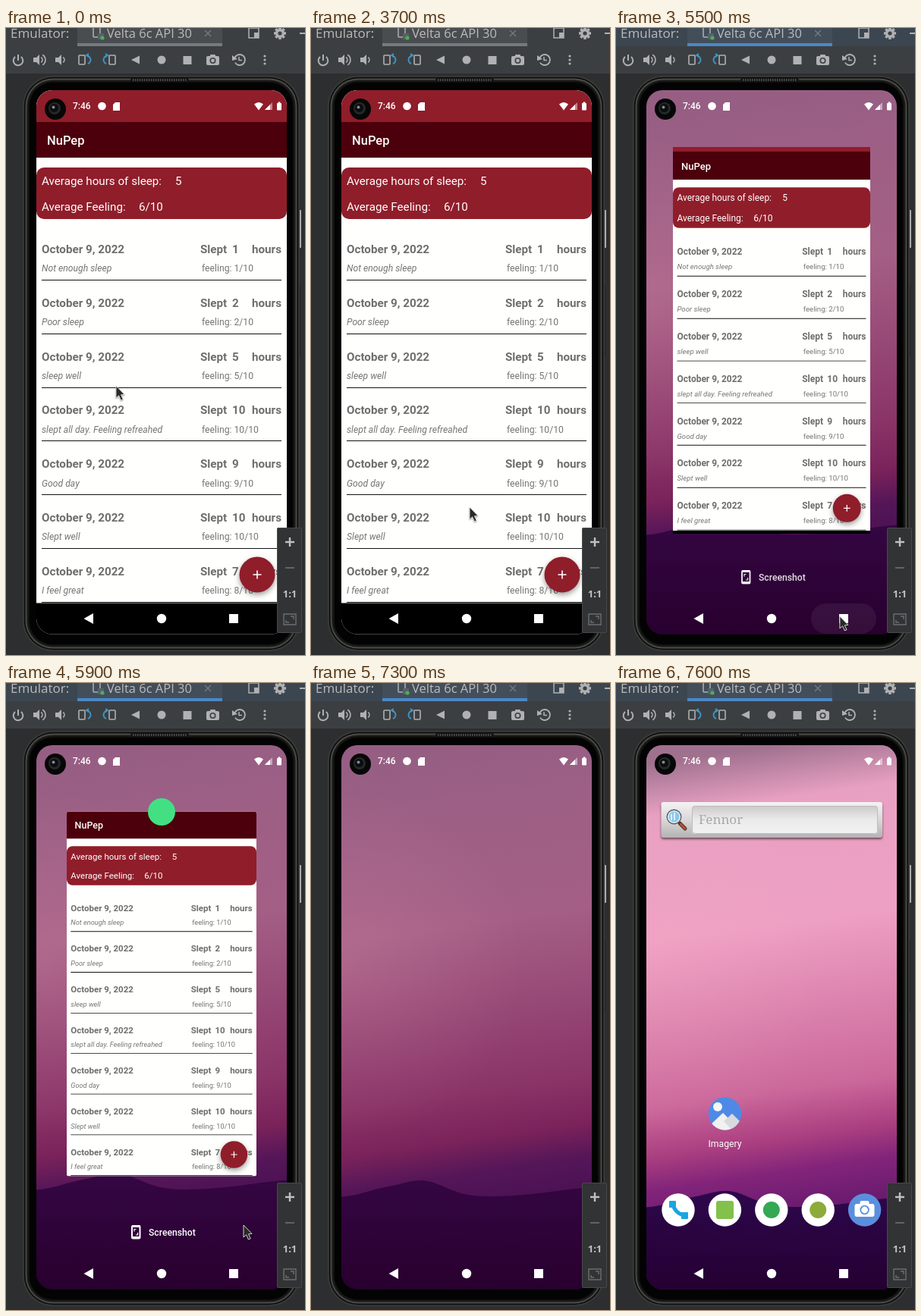
Write an HTML page with a canvas that moves like this. It is 394x827 px and loops after 8000 ms.

```html
<!DOCTYPE html>
<html lang="en">
<head>
<meta charset="utf-8">
<title>Sleep log on an emulator</title>
<style>
html, body { margin: 0; width: 100%; height: 100%; overflow: hidden; background: #2c2e30; }
canvas { display: block; width: 394px; height: 827px; }
</style>
</head>
<body>
<canvas id="stage"></canvas>
<script>
const W = 394, H = 827, LOOP = 8000, STEP = 100, TAU = Math.PI * 2;
const RED = '#901d2a', DARK_RED = '#4c000b', ICON = '#afb1b3', BLUE = '#3d94c4';
const ROBOTO = 'Roboto, sans-serif', UI = '"Open Sans", "Noto Sans", sans-serif';
const canvas = document.getElementById('stage');
const dpr = window.devicePixelRatio || 1;
canvas.width = W * dpr;
canvas.height = H * dpr;
const c = canvas.getContext('2d');

const clamp = v => Math.max(0, Math.min(1, v));
const lerp = (a, b, u) => a + (b - a) * u;
const span = (t, a, b) => clamp((t - a) / (b - a));

function box(x, y, w, h, fill, r = 0) {
  c.beginPath();
  c.roundRect(x, y, w, h, r);
  c.fillStyle = fill;
  c.fill();
}
function frame(x, y, w, h, color, width = 1.5, r = 0) {
  c.beginPath();
  c.roundRect(x, y, w, h, r);
  c.strokeStyle = color;
  c.lineWidth = width;
  c.stroke();
}
function disc(x, y, r, fill) {
  c.beginPath();
  c.arc(x, y, r, 0, TAU);
  c.fillStyle = fill;
  c.fill();
}
function arc(x, y, r, a, b, color, width) {
  c.beginPath();
  c.arc(x, y, r, a, b);
  c.strokeStyle = color;
  c.lineWidth = width;
  c.stroke();
}
function trace(pts) {
  c.beginPath();
  for (let i = 0; i < pts.length; i += 2) c.lineTo(pts[i], pts[i + 1]);
}
function poly(fill, ...pts) {
  trace(pts);
  c.closePath();
  c.fillStyle = fill;
  c.fill();
}
function line(color, width, ...pts) {
  trace(pts);
  c.strokeStyle = color;
  c.lineWidth = width;
  c.stroke();
}
function plus(x, y, size, width, color) {
  box(x - size / 2, y - width / 2, size, width, color);
  box(x - width / 2, y - size / 2, width, size, color);
}
function text(s, x, y, font, fill, align = 'left') {
  c.font = font;
  c.fillStyle = fill;
  c.textAlign = align;
  c.fillText(s, x, y);
}
function vertical(y0, y1, ...stops) {
  const g = c.createLinearGradient(0, y0, 0, y1);
  stops.forEach((s, i) => g.addColorStop(i / (stops.length - 1), s));
  return g;
}
function shadow(color, blur, dy) {
  c.shadowColor = color;
  c.shadowBlur = blur;
  c.shadowOffsetY = dy;
}
function fade(alpha, paint) {
  if (alpha <= 0) return;
  c.save();
  c.globalAlpha = alpha;
  paint();
  c.restore();
}

// ---- Emulator window ----

function header(focused) {
  box(0, 0, W, 24, focused ? '#3c4651' : '#3c3f41');
  box(94, 0, 191, 20, focused ? '#434e5b' : '#4a4d50');
  box(94, 20, 191, 4, focused ? '#4a88c7' : '#747a80');
  text('Emulator:', 6, 13, '17px ' + UI, '#bbbbbb');
  text('Velta 6c API 30', 133, 13, '16.5px ' + UI, '#bbbbbb');
  frame(115, -4, 9, 16, ICON, 1.5, 1);
  box(121, 7, 8, 8, '#53626b');
  disc(127, 13, 2.6, '#4fae50');
  line('#777a7d', 1.2, 262, 3, 270, 11);
  line('#777a7d', 1.2, 270, 3, 262, 11);
  frame(320, 0, 13, 13, ICON);
  box(327, 6, 6, 7, ICON);
  for (let i = 0; i < 4; i++) {
    const a = i * TAU / 8, dx = Math.cos(a) * 8, dy = Math.sin(a) * 8;
    line(ICON, 3.5, 361 - dx, 7 - dy, 361 + dx, 7 + dy);
  }
  disc(361, 7, 6, ICON);
  disc(361, 7, 2.6, '#3c4044');
  box(387, 6, 7, 2, ICON);
}

function speaker(x, waves) {
  poly(ICON, x - 7, 39, x - 3, 39, x + 1, 35, x + 1, 49, x - 3, 45, x - 7, 45);
  for (let i = 0; i < waves; i++) arc(x + 1, 42, 4 + i * 4, -1, 1, ICON, 1.6);
}
function rotateIcon(x, side) {
  c.save();
  c.translate(x, 42);
  c.scale(side, 1);
  frame(-8, -6, 8, 12, ICON, 1.6, 1);
  arc(2, 0, 5.5, -1.2, 1.2, BLUE, 2);
  poly(BLUE, 0, -6, 5, -9, 5, -3);
  c.restore();
}
function toolbar() {
  box(0, 24, W, 36, '#3c3f41');
  arc(16, 43, 6.3, -0.9, Math.PI + 0.9, ICON, 2);
  box(15, 35, 2, 8, ICON);
  speaker(43, 2);
  speaker(72, 1);
  rotateIcon(104, 1);
  rotateIcon(136, -1);
  poly(ICON, 165, 42, 176, 36.5, 176, 47.5);
  disc(205, 42, 5.5, ICON);
  box(233.5, 37, 11, 11, ICON);
  box(264, 37, 17, 12, ICON, 2);
  box(269, 35, 7, 4, ICON, 1);
  disc(272.5, 43, 4, '#3c3f41');
  disc(272.5, 43, 2.4, ICON);
  arc(308, 42, 7, -2.7, 2.6, ICON, 1.8);
  poly(ICON, 298, 36, 305, 41, 298, 43);
  line(ICON, 1.5, 307, 38, 307, 42.5, 311, 42.5);
  for (let i = 0; i < 3; i++) disc(341, 37 + i * 5, 1.6, ICON);
}

function phoneBody() {
  box(386, 240, 3, 50, '#a9abad', 1);
  box(386, 340, 2, 95, '#202122', 1);
  const rings = ['#3a3b39', '#0e0e0d', '#4b4c48', '#1d1e1c', '#10100f', '#030303'];
  rings.forEach((fill, i) => {
    const d = i * 1.8;
    box(22 + d, 63 + d, 365 - 2 * d, 759 - 2 * d, fill, 40 - d);
  });
  box(164, 66, 77, 5, '#151515', 2.5);
  c.setLineDash([1.5, 1.5]);
  line('#555655', 2.5, 167, 68.5, 239, 68.5);
  c.setLineDash([]);
}

function zoomPanel() {
  box(357, 659, 33, 139, '#313335', 2);
  frame(357.5, 659.5, 32, 138, '#47494b', 1, 2);
  plus(374, 678, 12, 2.4, '#bfc1c3');
  box(368, 711, 12, 2, '#616365');
  text('1:1', 374, 751, 'bold 13px ' + UI, '#bfc1c3', 'center');
  frame(366, 773, 16, 14, '#6c6e70', 1.4);
  line('#6c6e70', 1.4, 369, 781, 369, 784, 373, 784);
  line('#6c6e70', 1.4, 375, 776, 379, 776, 379, 780);
}

// ---- Sleep app, drawn in full-screen coordinates ----

const nights = [
  ['Not enough sleep', 1, 1], ['Poor sleep', 2, 2], ['sleep well', 5, 5],
  ['slept all day. Feeling refreahed', 10, 10], ['Good day', 9, 9],
  ['Slept well', 10, 10], ['I feel great', 7, 8]
];
function app() {
  const head = '15.2px ' + ROBOTO, bold = 'bold ' + head, small = '12.2px ' + ROBOTO;
  box(40, 82, 330, 718, '#fffffd');
  box(40, 82, 330, 42, RED);
  box(40, 124, 330, 47, DARK_RED);
  text('NuPep', 54, 154, '500 16.5px ' + ROBOTO, '#fff');
  box(40, 184, 330, 68, RED, 10);
  text('Average hours of sleep:', 47, 207, head, '#fff');
  text('5', 223, 207, head, '#fff');
  text('Average Feeling:', 47, 241, head, '#fff');
  text('6/10', 175, 241, head, '#fff');
  nights.forEach(([note, hours, feeling], i) => {
    const y = 297 + i * 70.83;
    text('October 9, 2022', 47, y, bold, '#6e6e6e');
    text('Slept', 256, y, bold, '#6e6e6e');
    text(hours, 298, y, bold, '#6e6e6e');
    text('hours', 324, y, bold, '#6e6e6e');
    text(note, 47, y + 24.3, 'italic ' + small, '#757575');
    text('feeling: ' + feeling + '/10', 258, y + 24.3, small, '#757575');
    box(47, Math.round(y + 35), 316, 1.1, '#111');
  });
  c.save();
  shadow('rgba(0,0,0,.4)', 7, 3);
  disc(331, 721, 23.5, RED);
  c.restore();
  plus(331, 721, 11, 1.6, '#fff');
  box(40, 758.5, 330, 42, '#000');
}

function appCard(p, dy) {
  const s = lerp(1, 0.7576, p);
  const top = lerp(82, 124, p ** 1.5), bottom = lerp(800, 758.5, p);
  c.save();
  c.translate(205, 292 + 5 * p ** 3 + dy);
  c.scale(s, s);
  c.translate(-205, -292);
  c.beginPath();
  c.roundRect(40, top, 330, bottom - top, p > 0.9 ? 3 : 0);
  c.clip();
  app();
  c.restore();
}

// ---- System screens ----

const skyAt = [0, 0.1, 0.33, 0.64, 0.73, 0.79, 1];
const duskSky = ['#965e83', '#9c5f85', '#a45f85', '#8a3468', '#7a225a', '#551658', '#320846'];
const dawnSky = ['#a0718f', '#e8a0c2', '#eea0c3', '#cb689b', '#aa3e80', '#82247a', '#3c0a5a'];

function sky(colors) {
  const g = c.createLinearGradient(155, 90, 255, 790);
  colors.forEach((color, i) => g.addColorStop(skyAt[i], color));
  box(40, 82, 330, 718, g);
  const glow = c.createRadialGradient(50, 370, 0, 50, 370, 230);
  glow.addColorStop(0, 'rgba(255,180,195,.14)');
  glow.addColorStop(1, 'rgba(255,180,195,0)');
  box(40, 82, 330, 718, glow);
}

// Three soft bumps make the mountain line.
const bump = (x, at, width, height) => height * Math.exp(-(((x - at) / width) ** 2));
const ridge = x => 678 - bump(x, 145, 44, 22) - bump(x, 88, 30, 7) - bump(x, 390, 90, 14);

function hills(dy, fill) {
  const pts = [];
  for (let x = 40; x <= 370; x += 5) pts.push(x, ridge(x) + dy);
  poly(fill, ...pts, 370, 800, 40, 800);
}
function wallpaper(bright, zoom) {
  const dy = lerp(-9, 14, zoom);
  sky(duskSky);
  hills(dy, vertical(660, 800, '#340642', '#28002e'));
  fade(bright, () => {
    sky(dawnSky);
    hills(dy, vertical(660, 800, '#2e084e', '#240032'));
  });
}

function statusBar() {
  text('7:46', 88, 107, '500 12px ' + ROBOTO, '#fff');
  disc(126.5, 103, 5.3, '#fff');
  poly('#fff', 144, 98, 150, 98, 150, 109, 141, 109, 141, 101);
  c.beginPath();
  c.moveTo(333, 108.5);
  c.lineTo(327, 100.5);
  c.quadraticCurveTo(333, 95.5, 339, 100.5);
  c.fillStyle = '#fff';
  c.fill();
  poly('rgba(255,255,255,.45)', 341, 108, 351, 98, 351, 108);
  poly('#fff', 341, 108, 348, 101, 348, 108);
  box(357, 99, 6, 9.5, '#fff', 1);
  box(358.7, 97.5, 2.6, 2, '#fff');
  disc(65, 107, 14, '#070707');
  disc(64, 106, 8, '#25282a');
  disc(63.5, 105.5, 5.5, '#0c0d0e');
  disc(62.5, 104.5, 2, '#85898c');
}
function navBar() {
  poly('#fff', 102.5, 779, 115, 772, 115, 786);
  disc(205, 779, 6.2, '#fff');
  box(294, 773, 12, 12, '#fff');
}

function screenshotButton() {
  frame(166, 716, 10.5, 16.5, '#fff', 2, 1.5);
  box(166, 715, 10.5, 3, '#fff');
  box(166, 730, 10.5, 3, '#fff');
  line('#fff', 1.2, 169, 723.5, 169, 720.5, 171.5, 720.5);
  line('#fff', 1.2, 173.5, 725, 173.5, 728, 171, 728);
  text('Screenshot', 188, 728.5, '500 12.2px ' + ROBOTO, '#fff');
}

function searchWidget() {
  c.save();
  shadow('rgba(0,0,0,.55)', 3, 2);
  box(59.5, 157, 291.5, 47, vertical(157, 204, '#f4f2f3', '#d9d7d8', '#b4b2b3'), 3);
  c.restore();
  box(100, 162, 245, 37, vertical(162, 199, '#cbc9ca', '#ecebeb', '#f3f2f2'), 4);
  frame(100.5, 162.5, 244, 36, '#bdbbbc', 1, 4);
  text('Fennor', 109, 186, '17px "Noto Serif", serif', '#aaa8a9');
  c.lineCap = 'round';
  line('#55342a', 5, 84, 185, 91, 192);
  line('#b9542c', 2.5, 85, 186, 91, 192);
  c.lineCap = 'butt';
  disc(76.5, 176.5, 10, '#53616b');
  disc(76.5, 176.5, 8.6, '#e3edf2');
  disc(76.5, 176.5, 7, '#8cc8e6');
  line('#d9f1fb', 2, 73, 181, 73, 173);
  line('#d9f1fb', 2, 77, 181, 77, 171);
}

function homeIcons() {
  disc(143.5, 568, 21.7, '#4f89e6');
  c.save();
  c.beginPath();
  c.arc(143.5, 568, 21.7, 0, TAU);
  c.clip();
  disc(134, 559, 6, '#f4f5f6');
  poly('#f1f1f1', 122, 585, 141, 567, 158, 584, 158, 592, 122, 592);
  poly('#d8dadd', 142, 578, 153, 568, 168, 583, 168, 592, 155, 592);
  c.restore();
  text('Imagery', 143.5, 612, '12.2px ' + ROBOTO, '#fff', 'center');

  for (let i = 0; i < 5; i++) disc(82 + i * 61.4, 695, 21.7, i < 4 ? '#fff' : '#5a8fdd');
  arc(92, 685, 17, TAU * 0.27, TAU * 0.48, '#1ba5e0', 5);
  box(70, 683, 9, 9, '#1ba5e0', 1);
  box(86, 698, 9, 9, '#1ba5e0', 1);
  box(132, 683, 23, 24, '#82c14b', 3);
  disc(204.8, 695, 11, '#34a853');
  disc(266.2, 695, 11, '#8cab3a');
  box(314.5, 687, 26, 17, '#fff', 3);
  box(321.5, 683, 12, 6, '#fff', 2);
  disc(327.6, 695, 6.2, '#5a8fdd');
  disc(327.6, 695, 4.4, '#fff');
}

// ---- Pointer: a few stops as time, x, y ----

const route = [
  [800, 145, 472], [1100, 105, 324], [1500, 209, 579], [1700, 107, 394], [1900, 223, 567],
  [2600, 123, 462], [3000, 242, 564], [3400, 215, 500], [3700, 209, 632], [4300, 248, 777],
  [4700, 294, 776], [5600, 295, 776], [5900, 313, 715], [6300, 237, 626], [6700, 223, 572]
];
function pointer(t) {
  const last = route.length - 1;
  const i = Math.max(0, route.findLastIndex(k => k[0] <= t));
  const [t0, x0, y0] = route[i], [t1, x1, y1] = route[Math.min(i + 1, last)];
  const u = i < last ? span(t, t0, t1) : 0;
  c.save();
  c.translate(lerp(x0, x1, u), lerp(y0, y1, u));
  shadow('rgba(0,0,0,.35)', 2, 1);
  c.lineJoin = 'round';
  poly('#2a2a2a', 0, 0, 0, 16, 3.7, 12.8, 6.4, 19, 9.2, 17.8, 6.5, 11.8, 11, 11.4);
  c.strokeStyle = '#e8e8e8';
  c.lineWidth = 0.9;
  c.stroke();
  c.restore();
}

function screen(t) {
  const p = 1 - (1 - span(t, 5200, 5800)) ** 3;
  const swipe = span(t, 7000, 7300), home = span(t, 7300, 7600);
  c.save();
  c.beginPath();
  c.roundRect(40, 82, 330, 717.5, 21);
  c.clip();
  wallpaper(home, span(t, 7100, 7600));
  fade(p * (1 - swipe), screenshotButton);
  if (swipe < 1) {
    const dy = -580 * swipe ** 2;
    appCard(p, dy);
    disc(205, 170 + dy, 18 * span(t, 5600, 5900), '#43e083');
  }
  fade(home, () => {
    searchWidget();
    homeIcons();
  });
  const press = span(t, 5000, 5200) * (1 - span(t, 5600, 5900));
  fade(press, () => box(257, 759, 86, 40, 'rgba(255,255,255,.06)', 20));
  statusBar();
  navBar();
  c.restore();
}

function draw(now) {
  const t = Math.floor((now % LOOP) / STEP) * STEP;
  c.setTransform(dpr, 0, 0, dpr, 0, 0);
  box(0, 0, W, H, '#2c2e30');
  header(t >= 5100);
  toolbar();
  phoneBody();
  screen(t);
  zoomPanel();
  if (t <= 7000) pointer(t);
}

const start = performance.now();
function tick() {
  draw(performance.now() - start);
  requestAnimationFrame(tick);
}
tick();
</script>
</body>
</html>
```
